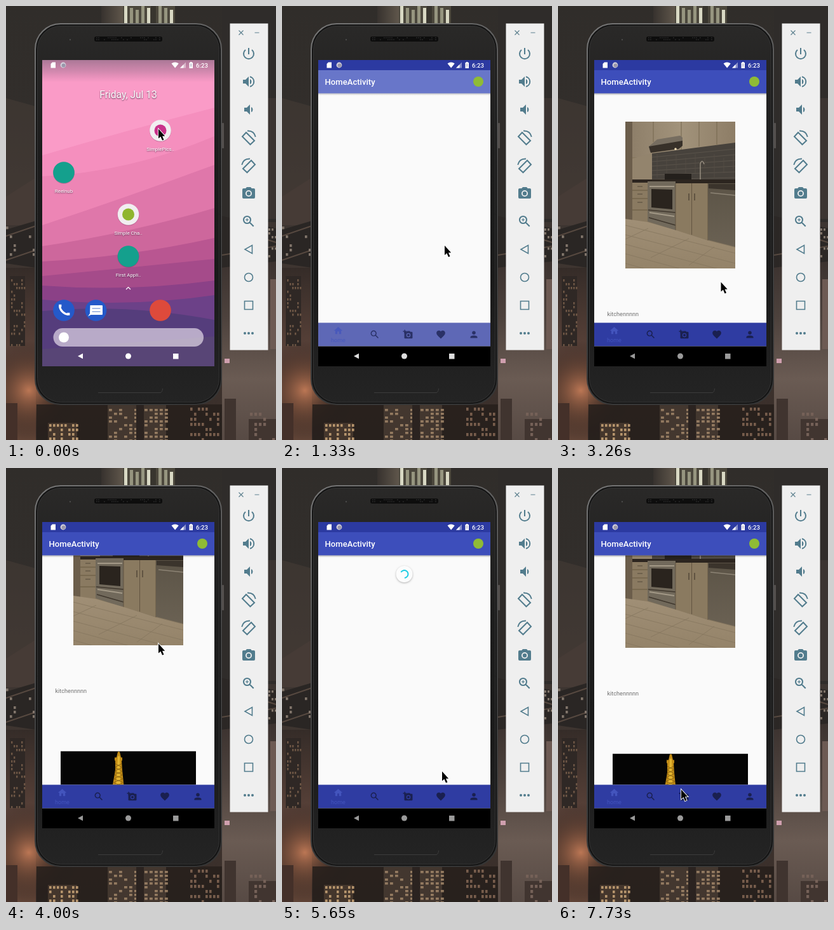
An HTML page with a canvas that plays this animation: 425 by 683 pixels, repeating every 8 s.

```html
<!DOCTYPE html>
<html lang="en">
<head>
<meta charset="utf-8">
<title>Phone emulator</title>
<style>
  html, body { margin: 0; width: 100%; height: 100%; overflow: hidden; background: #2f2c2a; }
  canvas { display: block; width: 425px; height: 683px; }
</style>
</head>
<body>
<canvas id="stage"></canvas>
<script>
const W = 425, H = 683, LOOP = 8000, STEP = 148.8, LEAD = 131;
const canvas = document.getElementById('stage');
const dpr = window.devicePixelRatio || 1;
canvas.width = W * dpr;
canvas.height = H * dpr;
const c = canvas.getContext('2d');
const SCREEN = { x: 57, y: 85, w: 271, h: 482 };

// ---------- helpers ----------
function rect(x, y, w, h, color) {
  c.fillStyle = color;
  c.fillRect(x, y, w, h);
}
function round(x, y, w, h, r, color, line) {
  c.beginPath();
  c.roundRect(x, y, w, h, r);
  if (color) { c.fillStyle = color; c.fill(); }
  if (line) { c.strokeStyle = line; c.stroke(); }
}
function disc(x, y, r, color) {
  c.beginPath();
  c.arc(x, y, r, 0, Math.PI * 2);
  c.fillStyle = color;
  c.fill();
}
function shape(d, color) {
  c.fillStyle = color;
  c.fill(new Path2D(d), 'evenodd');
}
function line(d, color, width = 1) {
  c.strokeStyle = color;
  c.lineWidth = width;
  c.stroke(new Path2D(d));
}
function text(s, x, y, size, color, align = 'left', weight = 400) {
  c.font = `${weight} ${size}px Roboto, Arial, sans-serif`;
  c.textAlign = align;
  c.fillStyle = color;
  c.fillText(s, x, y);
}
function gradient(x0, y0, x1, y1, ...stops) {
  const g = c.createLinearGradient(x0, y0, x1, y1);
  stops.forEach((s, i) => g.addColorStop(i / (stops.length - 1), s));
  return g;
}
function within(x, y, w, h, draw) {
  c.save();
  c.beginPath();
  c.rect(x, y, w, h);
  c.clip();
  draw();
  c.restore();
}
function place(x, y, draw) {
  c.save();
  c.translate(x, y);
  draw();
  c.restore();
}
// Icons live on a 24-unit grid centred on (x, y).
function icon(x, y, size, draw) {
  place(x, y, () => {
    c.scale(size / 24, size / 24);
    c.translate(-12, -12);
    draw();
  });
}
function random(seed) {
  return () => (seed = (seed * 16807) % 2147483647) / 2147483647;
}
// Linear interpolation through rows of [step, ...values].
function track(rows, k) {
  if (k <= rows[0][0]) return rows[0].slice(1);
  for (let i = 1; i < rows.length; i++) {
    const a = rows[i - 1], b = rows[i];
    if (k <= b[0]) {
      const p = (k - a[0]) / (b[0] - a[0]);
      return a.slice(1).map((v, j) => v + (b[j + 1] - v) * p);
    }
  }
  return rows[rows.length - 1].slice(1);
}

// ---------- desktop ----------
function lights(x, y, w, h, dx, dy, color, chance, seed) {
  const rnd = random(seed);
  for (let j = y; j < y + h; j += dy)
    for (let i = x; i < x + w; i += dx)
      if (rnd() < chance) rect(i, j, dx * .6, dy * .6, color);
}
function glow(x, y, r, color) {
  const g = c.createRadialGradient(x, y, 0, x, y, r);
  g.addColorStop(0, color);
  g.addColorStop(1, 'rgba(0,0,0,0)');
  c.fillStyle = g;
  c.fillRect(x - r, y - r, r * 2, r * 2);
}
function desktop() {
  rect(0, 0, W, H, gradient(0, 0, 0, H, '#302d2a', '#322e2b', '#3d3531', '#40352f', '#382d29'));
  shape('M0 145L47 158V330H0Z', 'rgba(72,62,57,.5)');
  shape('M0 300L47 270V345H0Z', '#463b36');
  // lit tower along the top
  rect(150, 0, 34, 28, gradient(150, 0, 184, 0, '#37322e', '#5f564b'));
  rect(184, 0, 82, 28, '#4c483d');
  for (let i = 0; i < 9; i++) rect(186 + i * 9, i % 3 * 3, 5, 28, i % 4 ? '#96957f' : '#d9d9c4');
  rect(228, 0, 8, 28, '#38352e');
  // right side
  rect(340, 0, 85, 340, '#2f2c2a');
  rect(412, 145, 13, 190, '#3b3431');
  rect(340, 395, 85, 288, gradient(0, 395, 0, H, '#3a312e', '#4d423d', '#6a5b53', '#574a44'));
  rect(416, 430, 9, 110, '#6d5a53');
  // ring structure
  shape('M0 352L47 338V412L0 405Z', '#2a2624');
  shape('M338 330L425 350V402L338 412Z', '#2b2725');
  line('M0 362L47 346M0 400L47 384M412 368L425 372M340 392L425 378', '#574940', 2);
  lights(0, 347, 46, 55, 6, 7, '#80746a', .2, 7);
  lights(413, 350, 12, 45, 5, 6, '#80746a', .25, 9);
  // lower city
  rect(0, 412, 47, 271, gradient(0, 412, 0, H, '#352c28', '#5a4239', '#5f4336'));
  rect(6, 425, 24, 110, '#2f2825');
  lights(8, 430, 22, 105, 4, 6, '#6d5645', .35, 21);
  glow(36, 605, 78, 'rgba(212,132,92,.8)');
  rect(0, 625, 18, 58, '#443029');
  rect(48, 627, 292, 56, 'rgba(38,31,28,.85)');
  rect(66, 656, 46, 27, '#44362c');
  lights(68, 658, 44, 25, 6, 7, '#b5946c', .7, 31);
  rect(160, 628, 92, 55, '#43372f');
  lights(162, 634, 90, 49, 8, 6, '#937a60', .55, 43);
  rect(205, 628, 12, 55, '#2b2320');
  lights(290, 632, 48, 51, 6, 8, '#775d4c', .45, 57);
  rect(344, 618, 18, 65, '#40342f');
  rect(382, 650, 43, 33, '#413530');
  lights(384, 640, 41, 43, 7, 8, '#756158', .35, 61);
  rect(344, 555, 8, 7, '#cf9fae');
}

// ---------- phone ----------
function phone() {
  c.lineWidth = 2;
  round(340, 184, 3, 40, 1, '#55514f');
  round(46, 28, 293, 599, 40, '#151515', gradient(46, 28, 339, 627, '#777', '#424242', '#343434'));
  c.lineWidth = 1;
  round(49.5, 31.5, 286, 592, 37, gradient(0, 30, 0, 627, '#2a2928', '#1d1d1d', '#1a1a1a', '#242424'), '#343434');
  round(139, 48, 107, 8, 3, '#0d0d0d');
  lights(142, 49, 101, 6, 3, 3, '#252525', .5, 71);
  disc(101, 53, 1.2, '#4a4a4a');
  line('M145 608.5H243Q246 608 246.500 602', '#3c3c3c');
}

// ---------- emulator panel ----------
const TEAL = '#527c8d';
function rotateIcon() {
  line('M8 4L21 17L14.500 23L2 10.500Z', TEAL, 2);
  line('M10 1.500Q20.500 1 22.800 11', TEAL, 1.8);
}
function cameraIcon(color) {
  shape('M9 2L7.200 4H4Q2 4 2 6V18Q2 20 4 20H20Q22 20 22 18V6Q22 4 20 4H16.800L15 2ZM12 7A5 5 0 1 1 12 17A5 5 0 1 1 12 7Z', color);
  disc(12, 12, 3.2, color);
}
function searchIcon(color) {
  line('M9.500 4A5.500 5.500 0 1 1 9.500 15A5.500 5.500 0 1 1 9.500 4ZM13.500 13.500L19.700 19.700', color, 2.1);
}
const TOOLS = [
  () => line('M12 3V13M7 6A8 8 0 1 0 17 6', TEAL, 2),
  () => {
    shape('M3 9H7L12 4V20L7 15H3ZM14 8Q16.500 9 16.500 12T14 16Z', TEAL);
    line('M14 4.200A8 8 0 0 1 14 19.800', TEAL, 2);
  },
  () => shape('M5 9H9L14 4V20L9 15H5ZM16 8Q18.500 9 18.500 12T16 16Z', TEAL),
  rotateIcon,
  () => { c.translate(24, 0); c.scale(-1, 1); rotateIcon(); },
  () => cameraIcon(TEAL),
  () => { searchIcon(TEAL); line('M9.500 7V12M7 9.500H12', TEAL, 1.2); },
  () => line('M17.500 5.500V18.500L6 12Z', TEAL, 1.6),
  () => line('M12 5.500A6.500 6.500 0 1 1 12 18.500A6.500 6.500 0 1 1 12 5.500Z', TEAL, 1.6),
  () => line('M5.500 5.500H18.500V18.500H5.500Z', TEAL, 1.6),
  () => [6, 12, 18].forEach(x => disc(x, 12, 2, TEAL)),
];
function panel() {
  rect(352.5, 27.5, 60, 514, '#efefef');
  line('M366.500 38.500L373.500 45.500M373.500 38.500L366.500 45.500M391.500 42H398.500', '#5d808f', 1.2);
  TOOLS.forEach((draw, i) => icon(382, 75 + i * 44, 24, draw));
}

// ---------- shared phone screen parts ----------
function statusIcons() {
  shape('M70.500 91L73 88.500H78V97.500H70.500Z', '#fff');
  disc(90, 93, 4.4, '#d5d2dc');
  disc(90.5, 93.5, 3, '#9a97ab');
  shape('M260.500 90.500Q266 86.500 271.800 90.500L266.200 97.500Z', '#fff');
  shape('M274 97.500L283 88.500V97.500Z', 'rgba(255,255,255,.45)');
  shape('M274 97.500L279.500 92V97.500Z', '#fff');
  shape('M288.500 89H290V88H292.500V89H294V98H288.500Z', '#fff');
  line('M291.200 90.500V95.500', '#8884a5', 1);
  text('6:23', 299, 96.7, 9.6, '#fff', 'left', 500);
}
function navButtons(color) {
  shape('M121 546.700V555.300L113 551Z', color);
  disc(192.5, 551, 4.5, color);
  rect(263, 547, 8.5, 8.5, color);
}

// ---------- launcher ----------
const HILLS = [
  [235, 195, 160, '#f58fbe'], [268, 262, 205, '#ed85b5'], [345, 300, 250, '#df77aa'],
  [378, 358, 318, '#cd679c'], [402, 395, 365, '#b95691'], [425, 412, 398, '#a54b8a'],
  [440, 450, 432, '#8b4187'], [462, 475, 455, '#6c4188'], [480, 468, 494, '#553d7c'],
  [540, 530, 520, '#584576'],
];
function launcherItem(x, y, label, plate, mark) {
  disc(x, y + .8, 17, 'rgba(60,20,60,.25)');
  disc(x, y, 16.8, plate);
  if (mark) disc(x, y, 9.5, mark);
  labelShadow(() => text(label, x, y + 32, 7.9, '#fff', 'center'));
}
function labelShadow(draw) {
  c.shadowColor = 'rgba(50,20,50,.8)';
  c.shadowBlur = 2 * dpr;
  c.shadowOffsetY = .5 * dpr;
  draw();
  c.shadowColor = 'transparent';
}
function launcher(pressed) {
  const { x, y, w, h } = SCREEN, right = x + w;
  rect(x, y, w, h, '#fa9bc7');
  for (const [l, m, r, color] of HILLS)
    shape(`M${x} ${l}Q${x + w / 2} ${m} ${right} ${r}V567H${x}Z`, color);
  rect(x, y, w, 35, gradient(0, y, 0, y + 35, 'rgba(105,90,110,.55)', 'rgba(130,100,125,.35)', 'rgba(150,100,130,0)'));
  statusIcons();
  labelShadow(() => text('Friday, Jul 13', 192.5, 145, 15.6, '#fff', 'center'));

  launcherItem(243, 196, 'SimplePics..', '#f1eef0', '#c9338b');
  if (pressed) disc(243, 196, 16.8, 'rgba(0,0,0,.15)');
  launcherItem(91, 262, 'Reelnub', '#14a08d');
  launcherItem(192.5, 328, 'Simple Cha..', '#f1eef0', '#8fb52e');
  launcherItem(192.5, 394, 'First Appli..', '#14a08d');
  line('M189 446L192.500 442.500L196 446', '#fff', 1.2);

  disc(91, 479, 16.8, '#2459c9');
  icon(91, 479, 25, () => {
    line('M6 5.500Q6 10 10 14T18.500 18', '#fff', 3.2);
    line('M4.500 5H8.500M19 15.500V19.500', '#fff', 4);
  });
  disc(141.5, 479, 16.8, '#2459c9');
  shape('M132.500 471H151Q152 471 152 472V485Q152 486 151 486H133.500L129 488.500L132 484Z', '#fff');
  line('M135.500 476H148.500M135.500 481H148.500', '#8ca6dd', 1.6);
  disc(243, 479, 16.8, '#de4a3b');

  round(74.5, 507, 236.5, 29, 14.5, 'rgba(240,232,242,.64)');
  disc(91, 521.5, 8, '#fff');
  navButtons('#fff');
}

// ---------- feed ----------
function kitchen() {
  rect(0, 0, 173, 231, '#86775f');
  rect(0, 0, 173, 56, gradient(0, 0, 173, 0, '#8b7c67', '#a2937b', '#8d7d66'));
  rect(0, 0, 11, 155, '#6b5d4b');
  shape('M11 58L42 50V92H11Z', '#93846d');
  shape('M42 50L88 44L173 33V93H42Z', '#47423c');
  for (let i = 0; i < 6; i++) line(`M42 ${56 + i * 7}L173 ${43 + i * 9}`, '#625b51', .7);
  for (let i = 0; i < 9; i++) line(`M${50 + i * 15} ${51 + i % 2 * 6}V${88 - i % 3 * 7}`, '#565047', .7);
  line('M44 0V32M88 0V44M116 0V39M144 0V36', '#75674f', 1);
  shape('M37 39L50 28L86 22L90 25V37L39 48Z', '#766d60');
  shape('M37 39L90 30V38L84 43L40 49Z', '#373029');
  disc(79, 43, 1.8, '#f1dfb8');
  line('M118 91V66Q121 58 124 67', '#a79d8e', 1.2);
  rect(62, 82, 42, 10, '#24201c');
  rect(11, 91, 162, 6, '#2c251f');
  // base units
  rect(11, 96, 24, 62, '#8a7a61');
  line('M11 108H35M11 121H35M11 139H35', '#66583f', 1);
  line('M19 102H27M19 114H27M19 127H27', '#54483a', 1.2);
  shape('M35 94H79V171L35 157Z', '#71695b');
  shape('M41 106L74 107V138L41 135Z', '#2a241e');
  line('M38 102H77M38 143L77 149', '#a39987', 1.8);
  line('M36 139L79 143M37 151L79 163', '#3f372d', 1.5);
  shape('M79 97H130V186L79 171Z', '#8a7a60');
  line('M104.500 97V178M79 97V171M130 97V187', '#625441', 1);
  line('M100 113V124M109 113V124', '#4f4436', 1.4);
  shape('M130 97H173V197L130 186Z', gradient(0, 97, 0, 197, '#5c5447', '#6a6153'));
  shape('M131 98H173V108L131 105Z', '#3b342c');
  line('M134 112L173 116', '#8d8475', 1.6);
  // floor
  shape('M0 153L35 158L80 171L130 187L173 198V231H0Z', gradient(0, 153, 0, 231, '#a08f76', '#948369'));
  for (let i = 0; i < 5; i++) line(`M0 ${163 + i * 15}L173 ${207 + i * 16}`, '#86775f', .8);
  line('M0 185L36 168M40 214L100 184M100 226L140 197', '#86775f', .8);
}
function tower() {
  rect(0, 0, 213, 230, '#050505');
  c.translate(-1, 0);
  shape('M91 1H94L96 10H98V15H97L98 30L102 70L118 150L150 230H122L92 170L62 230H35L66 150L80 70L87 30V15H86V10H89Z', '#c28c16');
  shape('M91 8H94L96 70L104 150H79L87 70Z', '#e3b42f');
  for (let y = 20; y < 150; y += 6) {
    const r = 3 + y * .09;
    line(`M${92 - r} ${y}L${92 + r} ${y + 5}M${92 + r} ${y}L${92 - r} ${y + 5}`, '#7d590f', .8);
  }
}
function spinner(y, size, turn) {
  place(192.5, y, () => {
    c.scale(size, size);
    c.shadowColor = 'rgba(0,0,0,.3)';
    c.shadowBlur = 3 * dpr;
    c.shadowOffsetY = dpr;
    disc(0, 0, 13, '#fcfcfc');
    c.shadowColor = 'transparent';
    c.rotate(turn);
    c.beginPath();
    c.arc(0, 0, 6, -2.6, 1.5);
    c.strokeStyle = '#20cde3';
    c.lineWidth = 2;
    c.stroke();
  });
}
const SCROLL = [[22, 0], [23, 30], [26, 134], [28, 152], [31, 152], [33, 40], [34, 0], [41, 0], [42, 10], [46, 130]];
const PULL = [[33, 124], [35, 167]];
function feed(k) {
  const loaded = k >= 12 && k !== 36 && k !== 37;
  const [scroll] = track(SCROLL, k);
  if (loaded) {
    place(106, 182 - scroll, () => within(0, 0, 173, 231, kitchen));
    text('kitchennnnn', 77.5, 488 - scroll, 9.1, '#737373');
    place(86, 579.5 - scroll, () => within(0, 0, 213, 230, tower));
  }
  if (k > 33 && k < 39) spinner(track(PULL, k)[0], k === 38 ? .5 : 1, (k - 37) * .9);
}
function bottomBar() {
  const ink = '#1a2050', active = '#4354bd';
  rect(57, 498.5, 271, 37, '#2f3ca2');
  icon(88.5, 511, 16, () => shape('M10 20V14H14V20H19V12H22L12 3L2 12H5V20Z', active));
  text('home', 88.5, 528.5, 9, active, 'center');
  icon(146, 517, 17, () => searchIcon(ink));
  icon(199, 518, 15.5, () => cameraIcon(ink));
  line('M190.500 512H196M193.200 509.500V515', ink, 1.4);
  icon(250, 517, 16.5, () => shape('M12 21.300L10.500 20C5.400 15.400 2 12.300 2 8.500C2 3 8.500 1 12 5.100C15.500 1 22 3 22 8.500C22 12.300 18.600 15.400 13.500 20Z', ink));
  icon(302, 517, 16.5, () => {
    disc(12, 8, 4, ink);
    shape('M4 20V18C4 12.700 20 12.700 20 18V20Z', ink);
  });
}
function app(k) {
  rect(57, 85, 271, 482, '#fafafa');
  within(57, 137.5, 271, 361, () => feed(k));
  // the bars fade in; the title reads at full strength on top
  c.globalAlpha = track([[5, 0], [8, .77], [9, 1]], k)[0];
  rect(57, 101, 271, 36.5, '#3d4ebb');
  rect(57, 137.5, 271, 3, gradient(0, 137, 0, 141, 'rgba(0,0,0,.3)', 'rgba(0,0,0,0)'));
  bottomBar();
  c.globalAlpha = k > 5 ? 1 : 0;
  text('HomeActivity', 67.5, 124.4, 13.1, '#fff', 'left', 500);
  disc(309, 119, 8, '#8fbb35');
  c.globalAlpha = 1;
  rect(57, 85, 271, 16, '#2c3aa1');
  statusIcons();
  rect(57, 535.5, 271, 31.5, '#000');
  navButtons(k < 10 ? '#dedede' : '#9a9a9a');
}

// ---------- pointer ----------
const POINTER = [
  [3, 240, 193.5], [8, 256, 377], [15, 253, 387], [21, 256.5, 434.5], [22, 256.5, 434.5],
  [26, 240, 276.5], [28, 238, 260], [30, 236, 323.5], [31, 236, 323.5], [35, 252, 477.5],
  [40, 252, 477.5], [41, 251, 524], [42, 249, 470], [46, 232, 326], [48, 230, 371],
  [51, 194, 506],
];
function pointer(k) {
  const [x, y] = track(POINTER, k);
  place(x, y, () => {
    const arrow = 'M0 0V15L3.400 12L6 18L8.500 16.900L6 11.200H10.200Z';
    line(arrow, '#fff', 1.8);
    shape(arrow, '#000');
  });
}

// ---------- playback ----------
function draw(k) {
  c.setTransform(dpr, 0, 0, dpr, 0, 0);
  desktop();
  phone();
  panel();
  const { x, y, w, h } = SCREEN;
  within(x, y, w, h, () => {
    if (k < 4) launcher(k >= 0);
    if (k > 0) {
      // the new window grows out of its launcher icon
      const [l, t, r, b] = track([[0, 226, 179, 260, 213], [4, x, y, x + w, y + h]], k);
      within(l, t, r - l, b - t, () => app(k));
    }
  });
  pointer(k);
}
let shown = null;
function tick() {
  const t = performance.now() % LOOP;
  const k = Math.min(51, Math.floor((t - LEAD) / STEP));
  if (k !== shown) draw(shown = k);
  requestAnimationFrame(tick);
}
tick();
</script>
</body>
</html>
```
